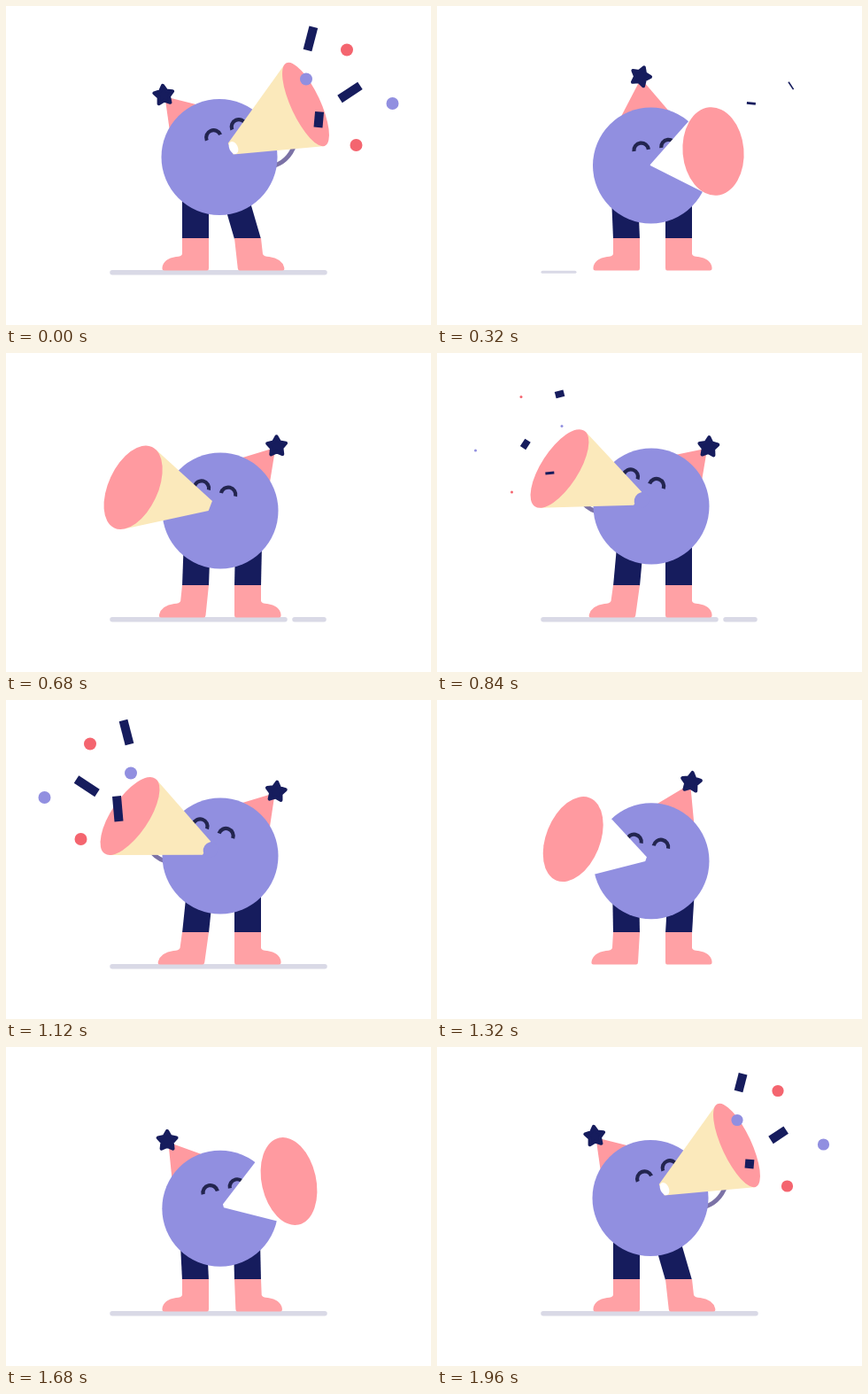
An HTML page with a canvas that plays this animation: 480 px wide and 360 px high, repeating every 2 s.

```html
<!DOCTYPE html>
<html lang="en">
<head>
<meta charset="utf-8">
<title>Party horn</title>
<style>
html, body { margin: 0; width: 100%; height: 100%; overflow: hidden; background: #fff; }
canvas { display: block; width: 480px; height: 360px; }
</style>
</head>
<body>
<canvas id="stage" width="480" height="360"></canvas>
<script>
const LOOP = 2000, STEP = 40, RAD = Math.PI / 180;
const NAVY = '#161c5d', PURPLE = '#918fe0', PINK = '#ff9aa0', BOOT = '#ffa1a5';
const RED = '#f4656f', CREAM = '#fbe9bb', ARM = '#7b72a6', GROUND = '#d9d9e6', EYE = '#23254f';
const g = document.getElementById('stage').getContext('2d');

// Rows: time, then values.
const bodyKeys = [[0, 241, 170.5], [180, 241, 172.5], [320, 241.5, 180], [430, 242, 187], [520, 242, 186],
  [680, 242, 178], [840, 242, 173], [910, 242, 172.5], [1120, 242, 176], [1300, 242, 181], [1480, 242, 188],
  [1600, 242, 186.5], [1760, 241.5, 177], [1920, 241, 170.5]];
// x, y, half width, tilt
const bellKeys = [[0, 338.5, 111, 16.6, -25], [160, 338.5, 113, 17, -24], [320, 312, 164, 34.5, -5],
  [420, 258, 190, 44, 0], [520, 196.5, 193, 44.5, 4], [640, 150, 163, 32, 20], [760, 137, 134, 22, 32],
  [840, 138.5, 130.5, 21, 33], [1120, 140, 131, 21, 34], [1280, 146, 146, 26, 27], [1400, 186, 185, 42, 8],
  [1480, 236, 195.3, 45, 0], [1600, 292, 179, 40, -4], [1720, 328, 138, 26, -17], [1840, 338.5, 113, 17, -24.5],
  [1960, 338.5, 111, 16.6, -25]];
// x, y, radius of the narrow end
const tipKeys = [[0, 254, 161, 7], [160, 254, 163, 7], [320, 241, 179.5, 0.5], [520, 241, 185, 0.5],
  [760, 226, 166, 8.5], [840, 226, 164, 9], [1120, 226, 167, 9], [1400, 239, 183, 1], [1600, 242, 185, 0.5],
  [1840, 254, 162, 7]];
// lean, length, star turn
const hatKeys = [[0, -42, 94, -6], [160, -39, 95, 0], [320, -6.5, 101, 20], [520, 24, 102, -8], [700, 42, 96, 0],
  [840, 44, 93, 4], [1120, 41, 96, 6], [1280, 33, 99, 8], [1480, -15, 101.5, 8], [1680, -38, 97, 0], [1880, -42, 94, -6]];
// midpoint, tilt
const eyeKeys = [[0, 248.5, 142, -23], [160, 248.5, 144, -21], [320, 246, 160.5, -7], [520, 242, 170, 0],
  [720, 235, 152, 16], [840, 233.5, 144.5, 20], [1120, 234, 147.5, 20], [1480, 242, 172, 0], [1640, 245, 164, -10],
  [1860, 248.5, 143, -23]];
// hip and sole offsets: left hip, left sole, right hip, right sole
const legKeys = [[0, 0, 0, -14, 4], [160, 0, 0, -12, 3.5], [320, -2, 0, 0, 0], [520, -4, 0, 4, 0], [760, 4, -5, 0, 0],
  [1120, 5, -5, 0, 0], [1480, -5, 0, 5, 0], [1640, -3, 0, 1, 1], [1880, 0, 0, -14, 4]];
const dotKeys = [[0, 0], [16, 1.5], [53, 6.6], [93, 7], [140, 7.6], [200, 7], [300, 7], [330, 7.5], [400, 0], [1990, 0]];

// Cyclic cubic interpolation, flat at turning points.
function at(keys, t) {
  const n = keys.length;
  const key = (i, c) => keys[(i + n) % n][c] + (c ? 0 : LOOP * Math.floor(i / n));
  let i = n - 1;
  while (i > 0 && keys[i][0] > t) i--;
  const t0 = key(i, 0), d = key(i + 1, 0) - t0, u = (t - t0) / d;
  const slope = (j, c) => {
    const da = key(j, 0) - key(j - 1, 0), db = key(j + 1, 0) - key(j, 0);
    const a = (key(j, c) - key(j - 1, c)) / da, b = (key(j + 1, c) - key(j, c)) / db;
    return a * b <= 0 ? 0 : 2 * a * b / (a + b);
  };
  return keys[0].slice(1).map((_, k) => {
    const c = k + 1, a = key(i, c), b = key(i + 1, c);
    return a + (b - a) * u * u * (3 - 2 * u) +
      d * u * (1 - u) * ((1 - u) * slope(i, c) - u * slope(i + 1, c));
  });
}

const ramp = (u, a, b) => Math.min(1, Math.max(0, (u - a) / (b - a)));

function poly(color, points) {
  g.fillStyle = color;
  g.beginPath();
  points.forEach(p => g.lineTo(p[0], p[1]));
  g.closePath();
  g.fill();
}

function oval(color, x, y, rx, ry = rx, tilt = 0) {
  g.fillStyle = color;
  g.beginPath();
  g.ellipse(x, y, rx, ry, tilt, 0, 7);
  g.fill();
}

function stroke(color, width, cap = 'butt') {
  g.strokeStyle = color;
  g.lineWidth = width;
  g.lineCap = cap;
  g.stroke();
}

function line(color, width, x1, y1, x2, y2, cap) {
  g.beginPath();
  g.moveTo(x1, y1);
  g.lineTo(x2, y2);
  stroke(color, width, cap);
}

function ground(t) {
  let parts = [[120, 360]], y = 300.7, w = 5.5;
  if (t >= 1320 && t < 1680) return;
  if (t >= 240 && t < 440) { parts = [[119, 156]]; y = 300.3; w = 3; }
  else if (t >= 440 && t < 680) { parts = [[120, 309], [337, 359]]; w = 4; }
  else if (t >= 680 && t < 960) parts = [[120, 315], [326, 359]];
  parts.forEach(([a, b]) => line(GROUND, w, a, y, b, y, 'round'));
}

function leg(x, hip, sole, dir) {
  poly(NAVY, [[x - 15 + hip, 215], [x + 15 + hip, 215], [x + 15, 263], [x - 15, 263]]);
  g.save();
  g.translate(x, 262);
  g.transform(dir, 0, sole / 36, 1, 0, 0);
  g.fillStyle = BOOT;
  g.beginPath();
  g.moveTo(-15, 0);
  g.lineTo(15, 0);
  g.lineTo(15, 18);
  g.quadraticCurveTo(16, 21, 22, 21);
  g.quadraticCurveTo(36, 23, 37.5, 33);
  g.quadraticCurveTo(38, 36.5, 35, 36.5);
  g.lineTo(-13, 36.5);
  g.quadraticCurveTo(-15, 36.5, -15, 34);
  g.fill();
  g.restore();
}

function hat(x, y, t) {
  const [lean, length, turn] = at(hatKeys, t);
  const half = 27 - 0.18 * Math.abs(lean);
  const polar = (deg, r) => [x + r * Math.sin(deg * RAD), y - r * Math.cos(deg * RAD)];
  poly(PINK, [polar(lean, length - 2), polar(lean + half, 64), polar(lean - half, 64)]);
  const [sx, sy] = polar(lean, length);
  const star = [];
  for (let i = 0; i < 10; i++) {
    const a = (turn + i * 36) * RAD, r = i % 2 ? 6 : 11;
    star.push([sx + r * Math.sin(a), sy - r * Math.cos(a)]);
  }
  poly(NAVY, star);
  g.beginPath();
  star.forEach(p => g.lineTo(p[0], p[1]));
  g.closePath();
  g.lineJoin = 'round';
  stroke(NAVY, 4);
}

function arm(x, y, bellX) {
  const dir = bellX > x ? 1 : -1;
  g.beginPath();
  if (dir > 0) {
    g.moveTo(x + 58, y + 11);
    g.quadraticCurveTo(x + 78, y + 6, x + 85, y - 14);
  } else {
    g.moveTo(x - 62, y + 6);
    g.quadraticCurveTo(x - 74, y + 2, x - 80, y - 8);
  }
  stroke(ARM, 5);
}

function eyes(t) {
  const [x, y, tilt] = at(eyeKeys, t);
  g.save();
  g.translate(x, y);
  g.rotate(tilt * RAD);
  for (const ex of [-15.5, 15.5]) {
    g.beginPath();
    g.arc(ex, 0.5, 8.3, Math.PI, 0);
    stroke(EYE, 4.2);
  }
  g.restore();
}

function horn(t, [x, y, rx, tilt]) {
  const [tx, ty, end] = at(tipKeys, t);
  const ry = 53 - 0.09 * rx, a = tilt * RAD, k = end / ry;
  const cos = Math.cos(a), sin = Math.sin(a), dx = tx - x, dy = ty - y;
  // Tangents found where the bell is a unit circle.
  const u = (dx * cos + dy * sin) / rx, v = (dy * cos - dx * sin) / ry, reach = Math.hypot(u, v);
  if (reach > 1 - k) {
    const mid = Math.atan2(v, u), open = Math.acos((1 - k) / reach);
    const edge = f => {
      const p = rx * Math.cos(f), q = ry * Math.sin(f);
      return [p * cos - q * sin, p * sin + q * cos];
    };
    const [e1, e2] = [edge(mid - open), edge(mid + open)];
    poly(rx > 30 ? '#fff' : CREAM, [
      [x + e1[0], y + e1[1]], [tx + k * e1[0], ty + k * e1[1]],
      [tx + k * e2[0], ty + k * e2[1]], [x + e2[0], y + e2[1]]]);
    if (rx < 26) {
      if (x > tx) oval('#fff', tx + 3, ty - 1, 4.8, 7.5, a);
      else oval(PURPLE, tx + 5, ty + 2, 8, 9, a);
    }
  }
  oval(PINK, x, y, rx, ry, a);
}

// Each burst is the mirror image of the other.
function confetti(t, start, mirror) {
  const u = (t - start + LOOP) % LOOP;
  if (u > 430) return;
  const fx = x => mirror ? 480 - x : x;
  const r = Math.max(0, at(dotKeys, u)[0]);
  [[385, 49.5, RED], [339, 82.5, PURPLE], [436.5, 110, PURPLE], [395.5, 157, RED]]
    .forEach(([x, y, color]) => oval(color, fx(x), y, r));
  const quick = 1 - (1 - ramp(u, 0, 110)) ** 2;
  [[340.5, 50, 347.5, 23, quick, 400], [377, 105, 400.5, 89.5, quick, 420], [352.5, 137, 355, 108.5, ramp(u, 0, 150), 425]]
    .forEach(([x1, y1, x2, y2, head, gone]) => {
      const tail = ramp(u, 300, gone);
      if (tail >= head) return;
      const px = f => fx(x1 + (x2 - x1) * f), py = f => y1 + (y2 - y1) * f;
      line(NAVY, 10, px(tail), py(tail), px(head), py(head));
    });
}

function draw(t) {
  g.fillStyle = '#fff';
  g.fillRect(0, 0, 480, 360);
  const [x, y] = at(bodyKeys, t), bell = at(bellKeys, t);
  const [hipL, soleL, hipR, soleR] = at(legKeys, t);
  ground(t);
  leg(214, hipL, soleL, -1);
  leg(273, hipR, soleR, 1);
  if (bell[2] < 25) arm(x, y, bell[0]);
  hat(x, y, t);
  oval(PURPLE, x, y, 65.5);
  eyes(t);
  horn(t, bell);
  confetti(t, 1907, false);
  confetti(t, 824, true);
}

const begin = performance.now();
function tick() {
  const t = Math.max(0, performance.now() - begin) % LOOP;
  draw(Math.floor(t / STEP) * STEP);
  requestAnimationFrame(tick);
}
tick();
</script>
</body>
</html>
```
